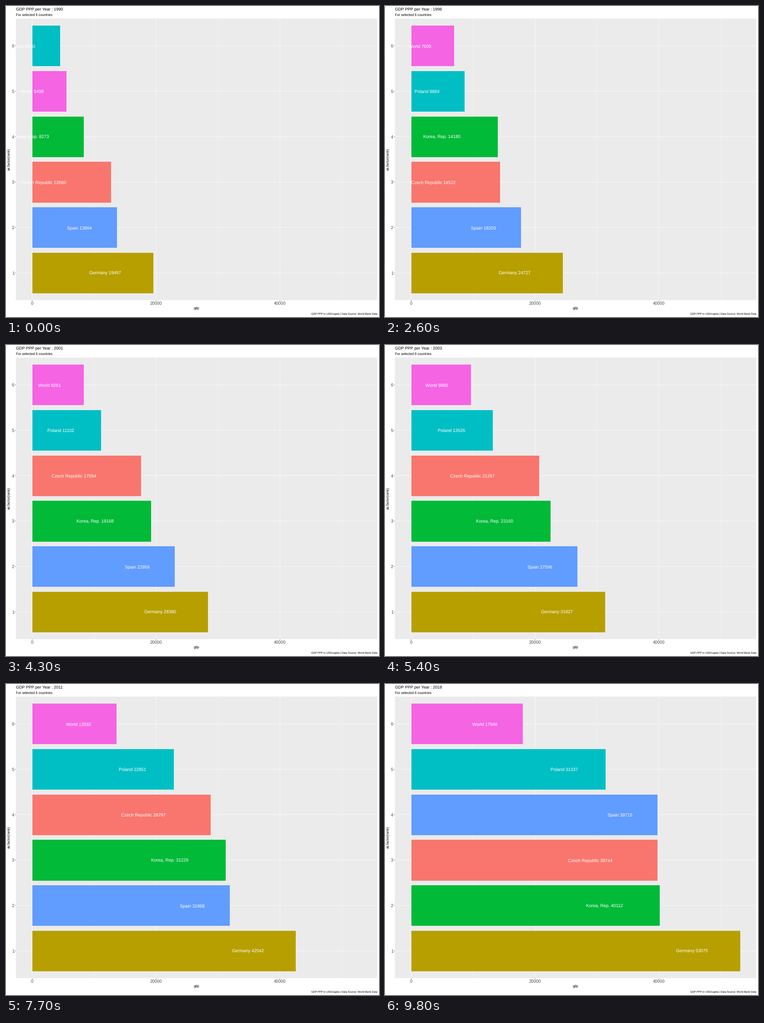
Recreate the animation shown at these times as a matplotlib script. Size 820x683 px, loop 10000 ms.

```python
import numpy as np
import matplotlib.pyplot as plt
from matplotlib.animation import FuncAnimation
from matplotlib.patches import Rectangle

WIDTH, HEIGHT, DPI = 820, 683, 64
FRAMES, INTERVAL = 100, 100
LEFT, RIGHT, TOP, BOTTOM = 21.6, 816.24, 27.6, 645.95
SCALE = 0.683  # pixels per typographic point of the layout
DROP = 4.1  # from a row's centre to the baseline of its text

COLORS = {"Czech Republic": "#F8766D", "Germany": "#B79F00",
          "Korea, Rep.": "#00BA38", "Poland": "#00BFC4",
          "Spain": "#619CFF", "World": "#F564E3"}

# GDP per capita at a few turning points, linear in between.
YEARS = np.arange(1990, 2019)
KEY_YEARS = [1990, 1991, 1994, 1995, 1998, 1999, 2001, 2006, 2008, 2011, 2012, 2018]
KEY_GDP = [
    [12660, 11610, 12725, 13753, 14906, 15450, 17554, 23776, 27900, 28797, 29050, 39744],
    [19497, 21070, 22796, 23528, 25327, 26291, 28380, 34125, 37820, 42542, 43340, 53075],
    [8273, 9350, 12061, 13299, 14621, 16450, 19168, 25821, 28700, 31229, 32100, 40112],
    [4450, 5810, 6849, 7665, 9464, 10022, 11102, 15142, 18300, 22851, 23850, 31337],
    [13664, 14500, 15620, 16262, 19174, 19954, 22959, 30688, 33200, 31868, 31850, 39715],
    [5498, 5640, 6266, 6528, 7244, 7536, 8261, 10959, 12450, 13592, 14130, 17948],
]
TABLE = np.array([np.interp(YEARS, KEY_YEARS, row) for row in KEY_GDP])
RANKS = (-TABLE).argsort(axis=0).argsort(axis=0) + 1

# Frame at which each year is reached: a slow pace first, then a faster one.
ARRIVALS = [0, *range(3, 59, 4), *range(59, FRAMES, 3)]

UNIT_X = (RIGHT - LEFT) / (1.1 * TABLE.max())
UNIT_Y = (BOTTOM - TOP) / 6.2


def x_at(value):
    return LEFT + (0.05 * TABLE.max() + value) * UNIT_X


def y_at(rank):
    return BOTTOM - (rank - 0.4) * UNIT_Y


def points(pixels):
    return pixels * 72 / DPI


plt.rcParams["font.family"] = "Liberation Sans"
plt.rcParams["text.hinting"] = "none"
fig = plt.figure(figsize=(WIDTH / DPI, HEIGHT / DPI), dpi=DPI, facecolor="white")
ax = fig.add_axes([0, 0, 1, 1])
ax.set(xlim=(0, WIDTH), ylim=(HEIGHT, 0))
ax.axis("off")


def write(x, y, text, size, color="black", **kw):
    return ax.text(x, y, text, fontsize=points(size * SCALE), color=color,
                   va="baseline", **kw)


def line(xs, ys, width, color="white"):
    ax.plot(xs, ys, color=color, lw=points(width), zorder=1, snap=False,
            solid_capstyle="butt")


def block(x, y, width, height, color, z):
    return ax.add_patch(Rectangle((x, y), width, height, fc=color, lw=0,
                                  zorder=z, snap=False))


panel = block(LEFT, TOP, RIGHT - LEFT, BOTTOM - TOP, "#EBEBEB", 0)

for value in (10000, 30000, 50000):
    line([x_at(value)] * 2, [TOP, BOTTOM], 0.37)
for rank in range(1, 7):
    y = y_at(rank)
    line([LEFT, RIGHT], [y, y], 0.73)
    line([LEFT - 1.88, LEFT], [y, y], 0.73, "#333333")
    write(LEFT - 3.4, y + DROP, str(rank), 14, "#4D4D4D", ha="right")
for value in (0, 20000, 40000):
    x = x_at(value)
    line([x, x], [TOP, BOTTOM], 0.73)
    line([x, x], [BOTTOM, BOTTOM + 1.88], 0.73, "#333333")
    write(x, 657, str(value), 14, "#4D4D4D", ha="center")

title = write(LEFT, 10.3, "", 13.2)
write(LEFT, 22, "For selected 6 countries", 11)
write((LEFT + RIGHT) / 2, 666.4, "gdp", 11, ha="center")
write(9, (TOP + BOTTOM) / 2, "as.factor(rank)", 11, rotation=90,
      rotation_mode="anchor", ha="center")
write(RIGHT, 677.5, "GDP PPP in USD/capita | Data Source: World Bank Data", 8.5,
      ha="right")

BAR_LEFT = np.ceil(x_at(0))
bars, labels = [], []
for color in COLORS.values():
    bars.append(block(BAR_LEFT, 0, 0, 0, color, 2))
    label = write(0, 0, "", 14.23, "white", ha="left", zorder=3, clip_on=True)
    label.set_clip_path(panel)
    labels.append(label)


def timeline(frame):
    """Index of the last year reached and the progress towards the next."""
    i = int(np.searchsorted(ARRIVALS, frame, side="right")) - 1
    if i == len(ARRIVALS) - 1:
        return i, 0.0
    steps = 3 if i == 0 else 2
    return i, max(0, frame - ARRIVALS[i + 1] + steps) / steps


def place(bar, y, end):
    """Set a bar around row y, its edges on whole pixels."""
    top = np.ceil(y - 0.45 * UNIT_Y)
    bar.set_y(top)
    bar.set_height(np.round(y + 0.45 * UNIT_Y) - top)
    bar.set_width(np.ceil(end) - BAR_LEFT)


def update(frame):
    i, p = timeline(frame)
    nxt = min(i + 1, len(YEARS) - 1)
    title.set_text(f"GDP PPP per Year : {YEARS[nxt if p > 0.5 else i]}")
    for k, name in enumerate(COLORS):
        # A country that changes rank waits in place, then jumps.
        t = p if RANKS[k, i] == RANKS[k, nxt] else 0
        value = (1 - t) * TABLE[k, i] + t * TABLE[k, nxt]
        shown = TABLE[k, nxt if t >= 0.5 else i]
        y, end = y_at(RANKS[k, i]), x_at(value)
        place(bars[k], y, end)
        labels[k].set_text(f"{name} {shown:.0f}")
        # The label's right edge stays one text width short of the bar's end.
        labels[k].set_x(end - 2 * labels[k].get_window_extent().width)
        labels[k].set_y(y + DROP)
    return [title, *bars, *labels]


anim = FuncAnimation(fig, update, frames=FRAMES, interval=INTERVAL,
                     repeat=True, repeat_delay=0, blit=False)
plt.show()
```
